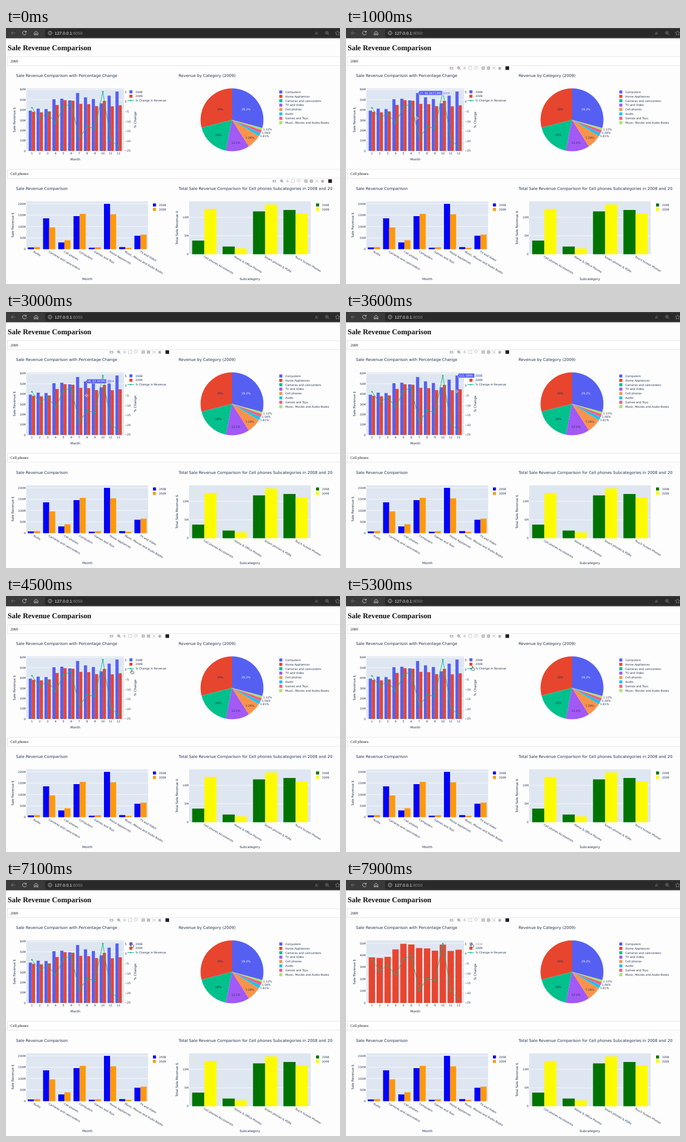
Animation of 600 by 460 pixels, one loop 8000 ms. Source, as an HTML page:

```html
<!DOCTYPE html>
<html lang="en">
<head>
<meta charset="utf-8">
<title>Sale Revenue Comparison</title>
<style>
html, body { margin: 0; width: 100%; height: 100%; overflow: hidden; background: #fdfdfd }
svg { display: block; font: 5.03px "DejaVu Sans", Verdana, sans-serif; fill: #22304f; text-rendering: geometricPrecision }
.title { font-size: 7.1px }
.axis { font-size: 5.8px }
.serif { font-family: "Liberation Serif", Times, serif; fill: #111 }
.url { font: 7.5px "Liberation Sans", Arial, sans-serif; fill: #f2f2f2 }
.icon { fill: none; stroke: #acaeb2; stroke-width: .8 }
.bar { fill: none; stroke: #cfcfcf; stroke-width: .9 }
.dim { stroke: #7c7c7c }
</style>
</head>
<body>
<svg id="stage" width="600" height="460" viewBox="0 0 600 460"></svg>
<script>
const BLUE = '#5560f3', RED = '#e8452f', GREEN = '#08b983', PLOT = '#dee6f1', ICON = '#acaeb2';
const rect = (x, y, w, h, fill, more = '') =>
  `<rect x="${x}" y="${y}" width="${w}" height="${h}" fill="${fill}" ${more}/>`;
const path = (d, more = '') => `<path d="${d}" ${more}/>`;
// Text whose vertical middle sits at y
const text = (x, y, s, anchor = 'start', more = '') =>
  `<text x="${x}" y="${y}" dy=".36em" text-anchor="${anchor}" ${more}>${s}</text>`;
const title = (x, y, s) => text(x, y, s, 'start', 'class="title"');
const axisTitle = (x, y, s, turn = 0) =>
  text(x, y, s, 'middle', `class="axis" transform="rotate(${turn} ${x} ${y})"`);
const group = (s, more = '') => `<g ${more}>${s}</g>`;

const legend = (x, y, gap, items) => items.map(([name, color], i) =>
  rect(x, y + i * gap - 2.7, 5.4, 5.4, color) + text(x + 10.8, y + i * gap, name)).join('');

// Plot area with horizontal grid and labels from zero upwards
function frame(x, y, w, h, count, gap, label) {
  let s = rect(x, y, w, h, PLOT);
  for (let i = 0; i <= count; i++) {
    const ty = y + h - i * gap;
    s += path(`M${x} ${ty}h${w}`, 'stroke="#fff" stroke-width=".7"') +
      text(x - 1, ty, i ? label(i) : '0', 'end');
  }
  return s;
}

// --- Monthly chart ---
const v08 = [39.4, 41.3, 40.90781, 50.5, 51, 49.4, 56.56713, 52.341, 50.7, 46.5, 54, 58];
const v09 = [38.2, 37.7, 38.6, 44.9, 49.6, 49, 46, 45.7, 43.8, 48.9, 43.6, 44.6];
const STEP = 14.16, HALF = STEP * .4, BASE = 221, UNIT = 1.842;
const monthX = i => 46.5 + i * STEP;

function monthly(both) {
  const unit = both ? UNIT : 2.145;
  let s = frame(36.5, 108.5, 175.5, BASE - 108.5, both ? 6 : 5, unit * 10, i => i * 10 + 'M');
  const bar = (x, v, w, color) => rect(x, BASE - v * unit, w, v * unit, color);
  v09.forEach((v, i) => {
    const x = monthX(i);
    s += both ? bar(x - HALF, v08[i], HALF, BLUE) + bar(x, v, HALF, RED)
              : bar(x - HALF, v, HALF * 2, RED);
    s += text(x, 225.6, i + 1, 'middle');
  });
  const pts = v09.map((v, i) => [monthX(i), 132.6 - (v / v08[i] - 1) * 351.7]);
  s += path('M' + pts.join('L'), `fill="none" stroke="${GREEN}" stroke-width=".95"`);
  s += pts.map(([x, y]) => `<circle cx="${x}" cy="${y}" r="1.35" fill="${GREEN}"/>`).join('');
  for (let v = 5; v >= -25; v -= 5)
    s += text(213.4, 132.6 - v * 3.517, String(v).replace('-', '−'));
  s += group(legend(221.7, 114.7, 8, [['2008', BLUE]]), both ? '' : 'opacity=".5"');
  s += legend(221.7, 122.6, 8, [['2009', RED]]);
  s += path('M218 130.5h12', `stroke="${GREEN}" stroke-width=".95"`) +
    `<circle cx="224" cy="130.5" r="1.35" fill="${GREEN}"/>` + text(232.5, 130.5, '% Change in Revenue');
  return s;
}

// --- Pie ---
const slices = [
  ['Computers', 29.2, BLUE], ['Home Appliances', 28.96, RED], ['Cameras and camcorders', 17.96, '#00c08c'],
  ['TV and Video', 12.1, '#a259f6'], ['Cell phones', 7.29, '#fd934a'], ['Audio', 1.81, '#19c5f0'],
  ['Games and Toys', 1.56, '#fa5a88'], ['Music, Movies and Audio Books', 1.12, '#a5e56a']];

function pie() {
  const cx = 406, cy = 165, r = 56.5;
  const at = p => [cx - r * Math.sin(p * Math.PI / 50), cy - r * Math.cos(p * Math.PI / 50)];
  let s = '', p = -29.2;
  for (const [, share, color] of slices) {
    s += path(`M${cx} ${cy}L${at(p)}A${r} ${r} 0 0 0 ${at(p + share)}Z`, `fill="${color}"`);
    p += share;
  }
  const labels = [[431, 146, '29.2%'], [385, 146, '29%'], [381.5, 192, '18%'], [413, 206, '12.1%'],
    [438, 197.5, '7.29%'], [464.5, 194.5, '1.81%'], [467.5, 188.5, '1.56%'], [469.7, 182.5, '1.12%']];
  labels.forEach(([x, y, t], i) => { s += text(x, y, t, 'middle', i ? '' : 'fill="#fff"'); });
  s += path('M455.5 191.5l1 3', 'stroke="#19c5f0" stroke-width=".5"') +
    path('M458 186.5l1 2', 'stroke="#fa5a88" stroke-width=".5"') +
    path('M459.8 181.7l1.2 .8', 'stroke="#a5e56a" stroke-width=".5"');
  return s + legend(491, 115, 7.87, slices.map(([name, , color]) => [name, color]));
}

// --- Grouped category bars: each row is name, top of first bar, top of second ---
function categories(x, w, base, rows, colors) {
  const step = w / rows.length, half = step * .4;
  return rows.map(([name, a, b], i) => {
    const c = x + step * (i + .5), y = base + 4;
    return rect(c - half, a, half, base - a, colors[0]) + rect(c, b, half, base - b, colors[1]) +
      text(c - .6, y, name, 'start', `transform="rotate(30 ${c - .6} ${y})"`);
  }).join('');
}

const byCategory = [['Audio', 394.3, 393.7], ['Cameras and camcorders', 342, 358.3],
  ['Cell phones', 385.3, 381.5], ['Computers', 338, 334], ['Games and Toys', 394.8, 394],
  ['Home Appliances', 316, 334.7], ['Music, Movies and Audio Books', 393.7, 395],
  ['TV and Video', 373.3, 371.3]];
const bySub = [['Cell phones Accessories', 382, 325], ['Home &amp; Office Phones', 392.7, 396],
  ['Smart phones &amp; PDAs', 329.5, 317], ['Touch Screen Phones', 327, 333]];

// --- Page furniture ---
function browser() {
  return rect(0, 0, 600, 18.5, '#3a3a3b') + rect(70, 2, 540, 14.5, '#29292a', 'rx="3"') +
    path('M16.5 9h-7m3-3l-3 3 3 3', 'class="bar dim"') +
    path('M36 7.2a3.4 3.4 0 1 0 .4 2.6M36.4 5v2.5h-2.5', 'class="bar"') +
    path('M50.7 8.7l3.3-3 3.3 3v3.8h-2.2v-2.6h-2.2v2.6h-2.2z', 'class="bar"') +
    path('M79.2 5.7a3.3 3.3 0 1 1-.1 0M79.2 8.7v2M79.2 7v.8', 'class="bar"') +
    text(87.5, 9.1, '127.0.0.1<tspan fill="#8c8c8c">:8050</tspan>', 'start', 'class="url"') +
    text(555, 9.2, 'A', 'start', 'font-size="7" fill="#7c7c7c"') +
    text(560, 7.5, ')', 'start', 'font-size="4" fill="#7c7c7c"') +
    path('M576.5 5.8a2.7 2.7 0 1 1-.1 0M578.5 10.5l2.3 2.3M575.2 8.5h2.6M576.5 7.2v2.6', 'class="bar dim"') +
    path('M595.5 5l1.2 2.7 2.9.3-2.2 2 .7 2.9-2.6-1.5-2.6 1.5.7-2.9-2.2-2 2.9-.3z', 'class="bar dim"');
}
const dropdown = (y, s) => rect(2.5, y, 610, 16, '#fff', 'stroke="#e0e0e0" stroke-width=".8"') +
  text(8, y + 7.7, s, 'start', 'class="serif" font-size="6.8"');

// Chart toolbar, starting at the centre of its first icon
const block = (x, y, w, h, color = ICON) => rect(x, y, w, h, color, 'stroke="none"');
const tools = group(
  block(-3, -2, 6, 4.4) + '<circle cy=".2" r="1.3" fill="#fdfdfd" stroke="none"/>' +
  path('M12.8-2.6a2.1 2.1 0 1 1-.1 0M14.3 1l2 2M11.8-.5h2M12.8-1.5v2', 'stroke="#666b75"') +
  path('M20.5 0h6M23.5-3v6') +
  path('M30.7-2.7h5.6v5.4h-5.6z', 'stroke-dasharray="1.2 .6"') +
  path('M41.5 1c-2-4 5-5 5-2s-5 2-4.5 3.5') +
  block(54.1, -2.7, 5.6, 5.4) + block(63.8, -2.7, 5.6, 5.4) +
  path('M55.3 0h3.2M56.9-1.6v3.2M65 0h3.2', 'stroke="#fdfdfd"') +
  path('M73.8-2.7l5.4 5.4M79.2-2.7l-5.4 5.4') +
  path('M83.5 0l3.2-2.7 3.2 2.7h-1v2.7h-4.4v-2.7z', `fill="${ICON}" stroke="none"`) +
  block(97, -3.2, 6.5, 6.5, '#1d1f2b'), 'class="icon"');

const stage = document.getElementById('stage');
stage.innerHTML = rect(0, 0, 600, 460, '#fdfdfd') + browser() +
  text(3, 35.2, 'Sale Revenue Comparison', 'start', 'class="serif" font-size="13.4" font-weight="bold"') +
  dropdown(51.5, '2009') + dropdown(254, 'Cell phones') +
  title(18, 85.3, 'Sale Revenue Comparison with Percentage Change') +
  group(monthly(true), 'id="both"') + group(monthly(false), 'id="single"') +
  axisTitle(124.5, 236.3, 'Month') + axisTitle(15, 165, 'Sale Revenue $', -90) +
  axisTitle(232, 165, '% Change', -90) +
  title(310, 85.3, 'Revenue by Category (2009)') + pie() +
  title(18, 288.3, 'Sale Revenue Comparison') +
  frame(36.5, 311.5, 218.8, 86, 4, 20.4, i => i * 50 + 'M') +
  categories(36.5, 218.8, 397.5, byCategory, ['#0303f8', '#ff980a']) +
  legend(264, 318, 8, [['2008', '#0303f8'], ['2009', '#ff980a']]) +
  axisTitle(146, 450.5, 'Month') + axisTitle(11.5, 354, 'Sale Revenue $', -90) +
  title(310, 288.3, 'Total Sale Revenue Comparison for Cell phones Subcategories in 2008 and 20') +
  frame(329, 311.5, 218.5, 95, 2, 33.2, i => i * 5 + 'M') +
  categories(329, 218.5, 406.5, bySub, ['#007400', '#fdfb04']) +
  legend(557, 318, 8, [['2008', '#007400'], ['2009', '#fdfb04']]) +
  axisTitle(438, 450.5, 'Subcategory') + axisTitle(307.3, 359, 'Total Sale Revenue $', -90) +
  group(tools, 'id="tools"') + group('', 'id="tip"') +
  group(path('M-3 0h6M0-3v6', 'stroke="#fff" stroke-width="1.6"') +
    path('M-2.6 0h5.2M0-2.6v5.2', 'stroke="#444" stroke-width=".6"'), 'id="cross"') +
  group(path('M-.8-3.3q.8-.8 1.5 0v2.6l2.4.6q.6.3.5 1.2l-.5 2.6h-3.6l-2.2-3 .6-.7 1.3.9z',
    'fill="#fff" stroke="#222" stroke-width=".7"'), 'id="hand"');
const part = id => document.getElementById(id);
const [both, single, bar, tip, cross, hand] = ['both', 'single', 'tools', 'tip', 'cross', 'hand'].map(part);

// Pointer: time, x, y
const route = [[400, 270, 214], [700, 175, 172], [1000, 127.5, 162], [1300, 127.5, 162], [1900, 73, 158],
  [2400, 73, 158], [2950, 144.5, 150], [3200, 145, 150], [3700, 205, 142], [4000, 226, 136],
  [5000, 226, 136], [5500, 228, 127], [6500, 228, 127], [6900, 226, 117]];

function pointer(t) {
  const i = route.findIndex(k => k[0] > t);
  if (i < 0) return route.at(-1).slice(1);
  if (!i) return route[0].slice(1);
  const [a, b] = [route[i - 1], route[i]], k = (t - a[0]) / (b[0] - a[0]), e = k * k * (3 - 2 * k);
  return [a[1] + (b[1] - a[1]) * e, a[2] + (b[2] - a[2]) * e];
}

function tooltip(x, y) {
  const i = Math.round((x - monthX(0)) / STEP), off = x - monthX(i);
  if (!(i >= 0 && i < 12) || Math.abs(off) > HALF || y > BASE) return '';
  const second = off >= 0, v = (second ? v09 : v08)[i], top = BASE - v * UNIT;
  if (y < top) return '';
  const label = `(${i + 1}, ${v}M)`, color = second ? RED : BLUE;
  const px = monthX(i) + (second ? HALF : -HALF) / 2;
  // Digits share one width; the other glyphs are summed apart
  const digits = label.replace(/\D/g, '').length;
  const w = (digits * .636 + 2.6) * 5.03 + 3;
  return path(`M${px} ${top}l2.5-2v-2h${w}v8h-${w}v-2z`, `fill="${color}" stroke="#fff" stroke-width=".5"`) +
    text(px + 4.2, top, label, 'start', 'fill="#fff"') +
    rect(px + w + 2.8, top - 4, 14.5, 8, '#eef1f7', 'opacity=".75"') +
    text(px + w + 3.7, top, second ? '2009' : '2008', 'start', `fill="${color}"`);
}

const show = (el, on) => el.setAttribute('display', on ? 'inline' : 'none');
let lastTip = '';
function draw(now) {
  const t = now % 8000, [x, y] = pointer(t), moved = t >= 400, onLegend = x > 216 && t > 3000;
  const hidden = t >= 7200;
  show(both, !hidden);
  show(single, hidden);
  bar.setAttribute('transform', moved ? 'translate(189.5 72)' : 'translate(482 275)');
  show(cross, moved && !onLegend);
  show(hand, onLegend);
  for (const el of [cross, hand]) el.setAttribute('transform', `translate(${x} ${y})`);
  const html = moved && !onLegend ? tooltip(x, y) : '';
  if (html !== lastTip) tip.innerHTML = lastTip = html;
  requestAnimationFrame(draw);
}
requestAnimationFrame(draw);
</script>
</body>
</html>
```
